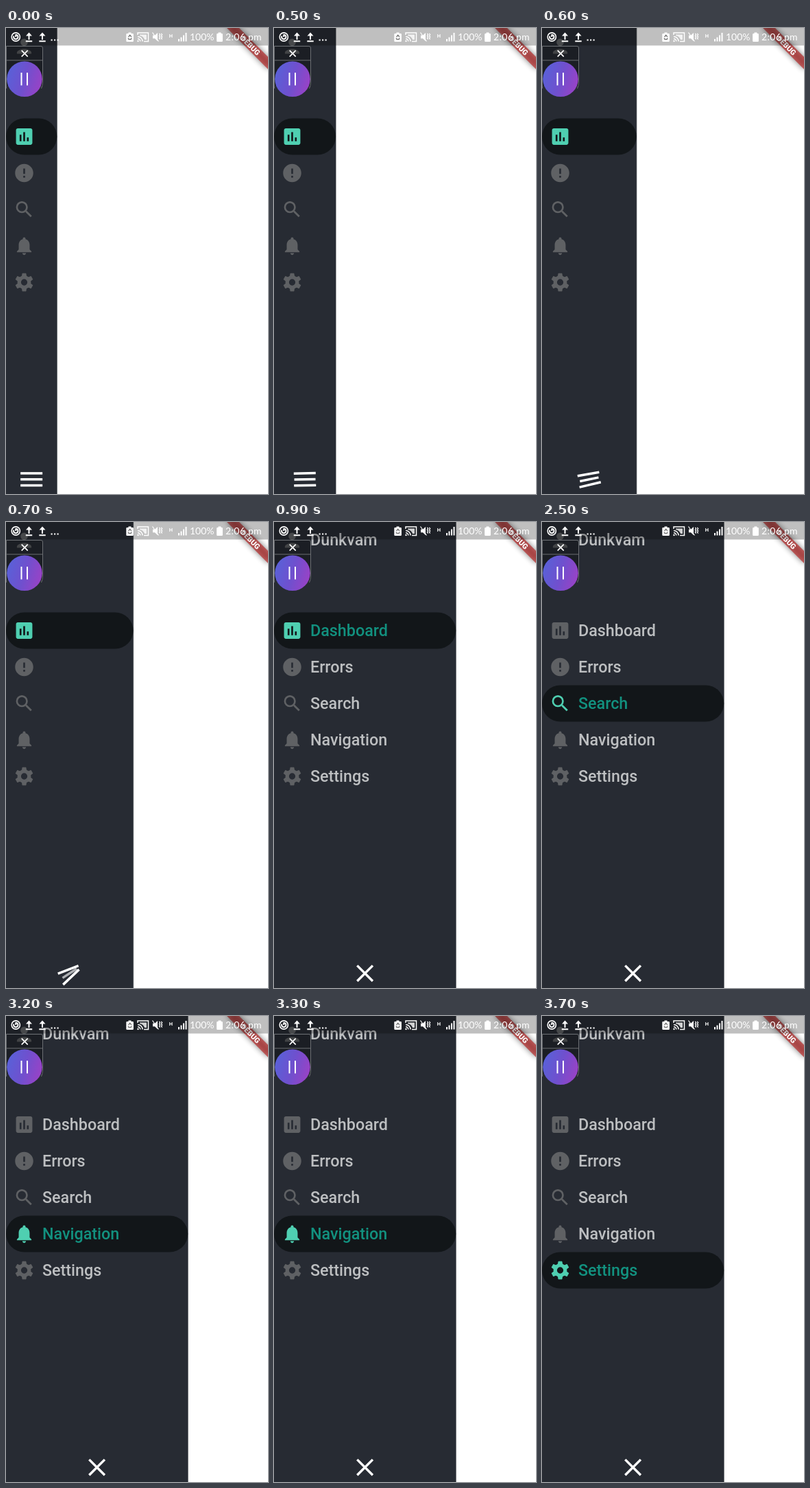
An HTML page for the animation above (4500 ms loop, 382 by 678 pixels).

```html
<!DOCTYPE html>
<html lang="en">
<head>
<meta charset="utf-8">
<title>Collapsing drawer</title>
<style>
  html, body { margin: 0; width: 100%; height: 100%; overflow: hidden; background: #fff; }
  svg { display: block; width: 100%; height: 100%; }
  .label { font: 500 23.3px Roboto, sans-serif; }
  .status { font: 14px Lato, sans-serif; fill: #fff; }
</style>
</head>
<body>
<svg viewBox="0 0 382 678">
  <defs>
    <linearGradient id="violet" x1="0" y1=".35" x2="1" y2=".65">
      <stop offset="0" stop-color="#5961d8"/>
      <stop offset=".5" stop-color="#6f50ce"/>
      <stop offset="1" stop-color="#9a42c6"/>
    </linearGradient>
    <filter id="soft" x="-30%" y="-150%" width="160%" height="400%">
      <feGaussianBlur stdDeviation="4"/>
    </filter>
  </defs>
  <rect width="382" height="678" fill="#fff"/>

  <rect id="edge" height="678" fill="#8d9093"/>
  <rect id="drawer" height="678" fill="#272b33"/>
  <rect id="pill" height="53" rx="26.5" fill="#121619"/>
  <g id="person" fill="#5f6164">
    <circle cx="26.5" cy="20.7" r="5.3"/>
    <path d="M15.9 37.5v-1.6c0-3.6 7-5.5 10.6-5.5s10.6 1.9 10.6 5.5v1.6z"/>
  </g>
  <text id="name" class="label" x="53" y="34.3" fill="#bdbfc1">Dunkvam</text>
  <g id="items"></g>
  <g id="menu" fill="#fff"></g>

  <g transform="translate(382 0) rotate(45)">
    <rect x="-42.4" y="29.7" width="84.8" height="12.7" fill="#000" opacity=".5" filter="url(#soft)"/>
    <rect x="-42.4" y="29.7" width="84.8" height="12.7" fill="#b71c1c" opacity=".63"/>
    <text y="39.9" text-anchor="middle" fill="#fff" style="font: 900 10.8px Roboto, sans-serif">DEBUG</text>
  </g>

  <rect width="382" height="25.5" opacity=".25"/>

  <g fill="none" stroke="#fff" stroke-width="1.6">
    <circle cx="14.3" cy="13" r="6.1"/>
    <path d="M14.3 9.8a3.2 3.2 0 1 1-2.9 1.8M14.3 9.3v3.8" stroke-width="2"/>
    <g id="upload">
      <path d="M33.5 17V8.5M28.8 19.2h9.4" stroke-width="2"/>
      <path d="M29 11.6l4.5-5 4.5 5z" fill="#fff" stroke="none"/>
    </g>
    <use href="#upload" x="19.5"/>
    <path d="M65.500 17.500h2.200m2.300 0h2.200m2.300 0h2.200" stroke-width="2"/>
  </g>

  <g fill="#fff">
    <path d="M178.500 8V6.500h4V8h2.200a1.200 1.200 0 0 1 1.200 1.200v9.600a1.200 1.200 0 0 1-1.200 1.200h-8.200a1.200 1.200 0 0 1-1.200-1.200V9.200a1.200 1.200 0 0 1 1.200-1.200z"/>
    <path d="M178.500 13l2.200-2.700 2.200 2.700m.3 1.500l-1 2h-3.200l-1-2" fill="none" stroke="#777" stroke-width="1.300"/>
    <path d="M192 10V7h15.500v12.500H201M192 12.500a7 7 0 0 1 7 7M192 15.700a3.800 3.800 0 0 1 3.800 3.800" fill="none" stroke="#fff" stroke-width="1.500"/>
    <path d="M195 9.500h10v7.500h-3a9 9 0 0 0-7-6z" opacity=".8"/>
    <circle cx="192.500" cy="19" r="1.200"/>
    <path d="M214 10.700h3l4-3.700v12l-4-3.700h-3z"/>
    <path d="M213.500 6.500l9 13M223.300 8l1.400 1.700-1.400 1.700 1.400 1.700-1.400 1.700 1.400 1.700M226.300 8l1.400 1.700-1.400 1.700 1.400 1.700-1.400 1.700 1.400 1.700" fill="none" stroke="#fff" stroke-width="1.200"/>
    <text x="237.700" y="13.500" style="font: 700 7.500px Roboto, sans-serif">H</text>
    <path d="M251 16h2v3.500h-2zM254.500 13.500h2v6h-2zM258 10.500h2v9h-2zM261.500 7h2v12.500h-2z"/>
    <path d="M309.500 8V6.500h4V8h1.200a1.200 1.200 0 0 1 1.200 1.200v9.600a1.200 1.200 0 0 1-1.200 1.200h-6.400a1.200 1.200 0 0 1-1.200-1.200V9.200a1.200 1.200 0 0 1 1.200-1.200z"/>
    <text class="status" x="268" y="18">100%</text>
    <text class="status" x="320" y="18" letter-spacing=".3">2:06 pm</text>
  </g>

  <path d="M.5 84V26.500H51a2.500 2.500 0 0 1 2.500 2.500V84z" opacity=".3"/>
  <path d="M.5 88V26.500H51a2.500 2.500 0 0 1 2.500 2.500V78q0 6-2 10M.5 47H53.500" fill="none" stroke="#6c6f73"/>
  <path d="M22.700 32.700l9 9m0-9l-9 9" stroke="#fff" stroke-width="1.700"/>
  <circle cx="27" cy="74.300" r="25.800" fill="url(#violet)"/>
  <path d="M22.500 65v18.500m8.500-18.500v18.500" stroke="#fff" stroke-width="2"/>
</svg>
<script>
const NS = "http://www.w3.org/2000/svg";
const LOOP = 4500, TICK = 100;
const MIN_W = 74.3, MAX_W = 265.2, LABEL_W = 201;
const OPEN_AT = 467, OPEN_MS = 400;
const PICKS = [1900, 2500, 3200, 3700];

const $ = id => document.getElementById(id);
function add(parent, tag, attrs) {
  const el = document.createElementNS(NS, tag);
  set(el, attrs);
  return parent.appendChild(el);
}
function set(el, attrs) {
  for (const k in attrs) el.setAttribute(k, attrs[k]);
}

const path = d => `<path d="${d}"/>`;
const tooth = a =>
  `<path d="M10.2 2.4h3.600l.8 5h-5.200z" stroke="currentColor" stroke-width=".8" stroke-linejoin="round" transform="rotate(${a} 12 12)"/>`;
const gear = '<circle cx="12" cy="12" r="5.5" fill="none" stroke="currentColor" stroke-width="4"/>' +
  [0, 60, 120, 180, 240, 300].map(tooth).join("");

const entries = [
  ["Dashboard", path("M19 3H5c-1.1 0-2 .9-2 2v14c0 1.1.9 2 2 2h14c1.1 0 2-.9 2-2V5c0-1.1-.9-2-2-2zM9 17H7v-7h2v7zm4 0h-2V7h2v10zm4 0h-2v-4h2v4z")],
  ["Errors", path("M12 2C6.48 2 2 6.48 2 12s4.48 10 10 10 10-4.48 10-10S17.52 2 12 2zm1 15h-2v-2h2v2zm0-4h-2V7h2v6z")],
  ["Search", '<circle cx="9.5" cy="9.5" r="5.5" fill="none" stroke="currentColor" stroke-width="2"/>' +
    path("M13.2 14.700l1.500-1.500.8.8 5 5L19 20.500l-5-5z")],
  ["Navigation", path("M12 22c1.1 0 2-.9 2-2h-4c0 1.1.89 2 2 2zm6-6v-5c0-3.07-1.64-5.64-4.5-6.32V4c0-.83-.67-1.5-1.5-1.5s-1.5.67-1.5 1.5v.68C7.63 5.36 6 7.92 6 11v5l-2 2v1h16v-1l-2-2z")],
  ["Settings", gear]
];

const rowY = i => 158 + 53 * i;
const rows = entries.map(([title, art], i) => {
  const icon = add($("items"), "g", {
    transform: `translate(10.6 ${rowY(i) - 15.9}) scale(1.325)`, fill: "currentColor"
  });
  icon.innerHTML = art;
  const text = add($("items"), "text", { class: "label", x: 53, y: rowY(i) + 7.5 });
  text.textContent = title;
  return { icon, text };
});

const bars = [-1, 0, 1].map(() => add($("menu"), "rect", { height: 3.5, y: -1.75 }));

// Menu lines swing counter-clockwise into a cross; the middle one fades.
function drawMenu(cx, p) {
  const angles = [-45 * p ** 1.4, -90 * p ** 1.85, -135 * p ** 2.1];
  const gap = 8.8 * (1 - p * p);
  bars.forEach((bar, i) => {
    const len = i === 1 ? 32 * (1 - .4 * p) : 32;
    set(bar, {
      x: -len / 2, width: len,
      opacity: i === 1 ? Math.min(1, 1.5 * (1 - p)) : 1,
      transform: `translate(${cx} 656.7) rotate(${angles[0]}) translate(0 ${gap * (i - 1)}) rotate(${angles[i] - angles[0]})`
    });
  });
}

function draw(t) {
  const p = Math.min(1, Math.max(0, (t - OPEN_AT) / OPEN_MS));
  const w = MIN_W + (MAX_W - MIN_W) * p;
  const picked = PICKS.filter(at => t >= at).length;
  const show = w >= LABEL_W ? "visible" : "hidden";

  set($("drawer"), { width: w });
  set($("edge"), { width: w + .7 });
  set($("pill"), { width: w, y: rowY(picked) - 26.5 });
  set($("name"), { visibility: show });
  rows.forEach(({ icon, text }, i) => {
    const on = i === picked;
    set(icon, { color: on ? "#4fcfb1" : "#5f6164" });
    set(text, { fill: on ? "#12917f" : "#bdbfc1", visibility: show });
  });
  drawMenu(w / 2, p);
}

const start = performance.now();
function frame() {
  const t = (performance.now() - start) % LOOP;
  draw(Math.floor(t / TICK) * TICK);
  requestAnimationFrame(frame);
}
frame();
</script>
</body>
</html>
```
